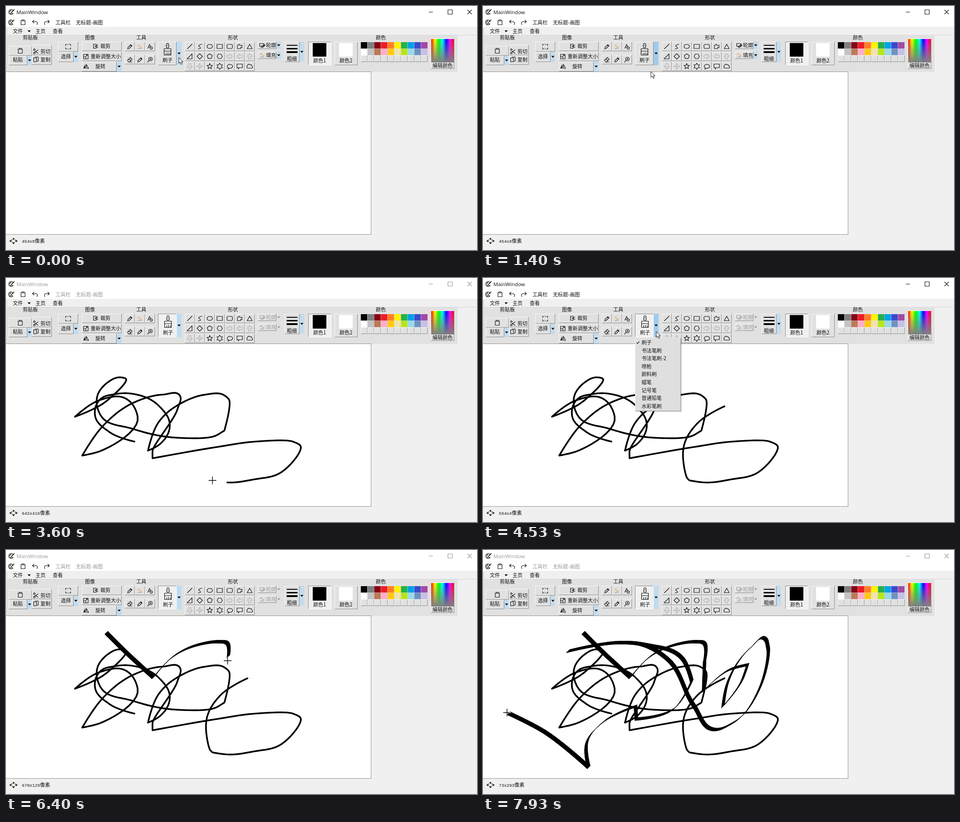
An HTML page for the animation above (8 s loop, 1038 by 540 pixels).

```html
<!DOCTYPE html>
<html lang="zh-CN">
<head>
<meta charset="utf-8">
<style>
html, body { margin: 0; height: 100%; overflow: hidden; background: #f0f0f0; }
svg { display: block; width: 100%; height: 100%; }
text { font: 11.1px "Noto Sans CJK SC", "Noto Sans CJK JP", "Noto Sans CJK", sans-serif; fill: currentColor; white-space: pre; }
.latin { font: 11.4px "Open Sans", "Noto Sans", sans-serif; }
.mono { font: 9.5px "Liberation Mono", monospace; }
.line { fill: none; stroke: currentColor; stroke-width: 1.2; stroke-linejoin: round; }
.solid { fill: currentColor; }
.strip { fill: #c3dcee; }
.dim { color: #b2b2b2; }
.handle { color: #999; }
.spill { color: #e0a63c; }
.idle #title { color: #999; }
.brush #opts, .brush #opts g { color: #a6a6a6; }
.brush #opts .strip { fill: #e1e1e1; }
.brush #opts .drop { fill: #999; }
#cross { mix-blend-mode: difference; }
</style>
</head>
<body>
<svg id="stage" viewBox="0 0 1038 540" color="#111"></svg>
<script>
const stage = document.getElementById('stage');
const $ = id => document.getElementById(id);

// ---------- drawing helpers ----------
const rect = (x, y, w, h, fill, more = '') =>
  `<rect x="${x}" y="${y}" width="${w}" height="${h}" fill="${fill}" ${more}/>`;
const text = (x, y, s, more = '') => `<text x="${x}" y="${y + 4}" ${more}>${s}</text>`;
const line = (d, more = '') => `<path class="line" d="${d}" ${more}/>`;
const solid = d => `<path class="solid" d="${d}"/>`;
const tint = (name, body) => `<g class="${name}">${body}</g>`;
const at = (x, y, body) => `<g transform="translate(${x} ${y})">${body}</g>`;
const edge = (x, y, w, h, lit, dark) =>
  `<path d="M${x + .5} ${y + h - .5}V${y + .5}H${x + w - .5}" fill="none" stroke="${lit}"/>` +
  `<path d="M${x + .5} ${y + h - .5}H${x + w - .5}V${y + .5}" fill="none" stroke="${dark}"/>`;
const button = (x, y, w, h) => rect(x, y, w, h, '#e1e1e1') + edge(x, y, w, h, '#f8f8f8', '#8a8a8a');
const sunken = (x, y, w, h) => rect(x, y, w, h, '#f0f0f0') + edge(x, y, w, h, '#8a8a8a', '#fff');
const triangle = (x, y) => `<path class="drop" d="M${x - 3.5} ${y - 2}h7l-3.5 4z"/>`;
const drop = (x, y, w, h, id = '') =>
  rect(x, y, w, h, '', `class="strip" id="${id}"`) + triangle(x + w / 2, y + h / 2);
const ring = (n, a, b = a, turn = 0) => 'M' + Array.from({ length: n }, (_, i) => {
  const r = i % 2 ? b : a, k = turn - Math.PI / 2 + i * 2 * Math.PI / n;
  return (r * Math.cos(k)).toFixed(1) + ' ' + (r * Math.sin(k)).toFixed(1);
}).join('L') + 'z';

// ---------- icons, centred on 0,0 ----------
const palette = line('M4-4A5.5 5.5 0 1 0 4.5 3C3 2 1 4 0 2S3 1 7-6L0 1') +
  solid('M-4-2h2v2h-2zM-2-4h2v2h-2zM-3 2h2v2h-2z');
const clip = line('M-2-4h-2.5v9.5h9v-9.5h-2.5M-2-5.5h4v2.5h-4z');
const pencil = line('M-5 5l1-3.5 6-6 2.5 2.5-6 6zM1-3.5l2.5 2.5');
const bucket = tint('handle', line('M-5 4h9')) + tint('spill', line('M-3-5l4 7 3-2')) + tint('dim', line('M-6-1l3-2'));
const brush = line('M-2-13.5q2-2.5 4 0l1 5-1 4h-4l-1-4zM-7.5-2.5h15v14h-15zM-7.5 3h15M-3 11v-4M1 11v-5M5 11v-4M0-11v2');
const undo = line('M-2-5l-3.5 3.5 3.5 3.5M-5-1.5h6c5 0 5 5 3 7');
const arrow = turn => `<g transform="rotate(${turn})">${line('M-6-2.5h6v-3l6 5.5-6 5.5v-3h-6z')}</g>`;
const shapes = [
  line('M-5.5 5.5l11-11'),
  line('M-4 5c7 1 7-2 3-4.5S0-4 5-5'),
  '<ellipse class="line" rx="6" ry="4.5"/>',
  line('M-6-4.5h12v9h-12z'),
  '<rect class="line" x="-6" y="-4.5" width="12" height="9" rx="2.5"/>',
  line('M-5 5v-7l4-3 2 3 4-1v6l-3-1v3z'),
  line('M0-5l5.5 10h-11z'),
  line('M5-5.5v11h-11z'),
  line(ring(4, 6)),
  line(ring(5, 5.8)),
  line(ring(6, 5.8, 5.8, Math.PI / 6)),
  ...[0, 180, -90, 90].map(turn => tint('dim', arrow(turn))),
  tint('dim', line(ring(8, 7, 2))),
  line(ring(10, 6.5, 2.8)),
  line(ring(12, 7, 4)),
  line('M-3 3.5a6 4.3 0 1 1 3 .8l-4 2z'),
  line('M-6-5h12v8h-7l-2 3v-3h-3z'),
  line('M-4 4a3 3 0 0 1-1-5.5a3.5 3.5 0 0 1 6-2a3 3 0 0 1 4 3a2.4 2.4 0 0 1 0 4.5z')
];

const swatches = ('#000 #7f7f7f #880015 #ed1c24 #ff7f27 #fff200 #22b14c #00a2e8 #3f48cc #a349a4 ' +
  '#fff #c3c3c3 #b97a57 #ffaec9 #ffc90e #efe4b0 #b5e61d #99d9ea #7092be #c8bfe7').split(' ');
const brushes = '刷子 书法笔刷 书法笔刷-2 喷枪 颜料刷 蜡笔 记号笔 普通铅笔 水彩笔刷'.split(' ');
const rowH = 17.62;

// ---------- window parts ----------
const frame = () =>
  rect(0, 0, 1038, 540, '#f0f0f0') + rect(0, 0, 1038, 46, '#fff') + rect(0, 64, 995, 82, '#e1e1e1') +
  rect(0, 64, 1038, 1, '#d8d8d8') + at(11.5, 13.5, palette) + at(11, 36.5, palette) + at(37.5, 36, clip) +
  at(64, 36, undo) + at(90, 36, `<g transform="scale(-1 1)">${undo}</g>`) +
  '<g id="title">' + text(23, 14, 'MainWindow', 'class="latin"') + text(109, 37, '工具栏') + text(154, 37, '无标题-画图') +
  line('M931.5 13.5h9.5M974 8.5h9.5v9.5h-9.5zM1017 8.5l9.5 9.5m0-9.5l-9.5 9.5') + '</g>' +
  tint('dim', line('M1.5 50v12', 'stroke-dasharray="1 2"')) +
  text(15, 56, '文件') + triangle(51, 56) + text(65, 56, '主页') + text(103, 56, '查看') +
  text(37, 70, '剪贴板') + text(174, 70, '图像') + text(287, 70, '工具') + text(489, 70, '形状') + text(815, 70, '颜色');

const clipboard = () =>
  button(6, 88, 51, 22) + at(31.5, 99, clip) + button(6, 110, 41, 21) + text(15, 119, '粘贴') + drop(47, 110, 10, 21) +
  button(57, 86, 44, 23) + text(76, 101, '剪切') + button(57, 109, 44, 21) + text(76, 119, '复制') +
  at(65, 101, line('M-1-1L6 4M-1 1L6-4M-2.5-2.5a1.8 1.8 0 1 0-.1 0M-2.5 5a1.8 1.8 0 1 0-.1 0')) +
  at(66, 119, line('M-5-4.5h6v9h-6zM-2-6h7v9h-3'));

const imageTools = () =>
  button(115, 79, 44, 22) + at(137, 90, line('M-5.5-2v-3h3M2.5-5h3v3M5.5 2v3h-3M-2.5 5h-3v-3M-1-5h2M-1 5h2')) +
  button(115, 101, 34, 23) + text(121, 112, '选择') + drop(149, 101, 10, 23) +
  button(167, 79, 88, 21) + at(198, 89, line('M-5-4.5h6v9h-6zM-2-1l7 4M-2 1l7-4')) + text(208, 89, '裁剪') +
  button(167, 101, 88, 21) + at(176, 112, line('M-5-5h10v10h-10zM-5 0h5v5M0-1l3-3M1-4h2v2')) + text(186.5, 112, '重新调整大小') +
  button(167, 123, 77, 22) + at(176, 134, solid('M-1-5v9h-5z') + line('M1-5v9h5z')) + text(197, 134, '旋转') +
  drop(244, 123, 11, 22);

function tools() {
  const letter = line('M-5 4l4-9 3 6M-3.5 1h4') + '<circle class="line" cx="2.5" cy="3" r="2.6"/>';
  const eraser = line('M-5 1l6-6 4 4-6 6h-2zM-2-2l4 4M-1 5h6');
  const zoom = '<circle class="line" cx="1" cy="-1.5" r="4"/>' + line('M-2 1.5l-4 4M-1-1.5h4M1-3.5v4');
  return [pencil, bucket, letter, eraser, pencil, zoom].map((icon, i) => {
    const x = 262 + i % 3 * 22.2, y = i < 3 ? 79 : 108;
    return button(x, y, 22, 21) + at(x + 11, y + 11, icon);
  }).join('') + `<g id="up">${button(335, 79, 41, 52)}</g><g id="down">${sunken(335, 79, 41, 52)}</g>` +
    `<g id="brush">${at(356, 97, brush)}${text(345, 120, '刷子')}</g>` + drop(376, 79, 11, 52, 'strip');
}

const shapeGrid = () => shapes.map((icon, i) => {
  const x = 394 + i % 7 * 22, y = 79 + (i / 7 | 0) * 22;
  return button(x, y, 22, 21) + at(x + 11, y + 10.5, icon);
}).join('');

const options = () =>
  '<g id="opts">' + button(555, 79, 41, 16) + at(565, 87, line('M-6-4h9v6h-9zM-3 4l3 1 6-5-2-2-5 4z')) +
  text(573, 87, '轮廓') + drop(596, 79, 10, 16) + button(555, 101, 41, 16) + at(565, 109, bucket) +
  text(573, 109, '填充') + drop(596, 101, 10, 16) + '</g>' + button(614, 79, 33, 45) +
  [2, 3, 4].map((h, i) => rect(618.5, 86 + i * 7, 24, h, '#000')).join('') +
  text(619, 117, '粗细') + drop(647, 79, 10, 45);

function colours() {
  let s = sunken(666, 79, 51, 52) + rect(676, 82, 30, 30, '#000') + text(677, 121, '颜色1') +
    button(724, 79, 51, 52) + rect(734, 82, 30, 30, '#fff') + text(735, 121, '颜色2');
  for (let i = 0; i < 30; i++) {
    const x = 782 + i % 10 * 14.75, y = 80 + (i / 10 | 0) * 14.6;
    s += i < 20 ? rect(x, y, 14.2, 14.2, swatches[i]) : button(x, y, 14.7, 14.6);
  }
  const stops = Array.from({ length: 7 }, (_, i) => `<stop offset="${i / 6}" stop-color="hsl(${i * 60} 100% 50%)"/>`).join('');
  return s + `<defs><linearGradient id="hue">${stops}</linearGradient><linearGradient id="fade" x2="0" y2="1">` +
    '<stop stop-color="#808080" stop-opacity="0"/><stop offset="1" stop-color="#808080"/></linearGradient></defs>' +
    button(936, 72, 52, 67) + rect(937, 73, 50, 52, 'url(#hue)') + rect(937, 73, 50, 52, 'url(#fade)') + text(940, 132, '编辑颜色');
}

const paper = () =>
  rect(-.5, 145.5, 805, 360, '#fff', 'stroke="#8f8f8f"') +
  '<path id="pen" fill="none" stroke="#000" stroke-width="3.7" stroke-linecap="round" stroke-linejoin="round"/>' +
  '<path id="nib" stroke="#000" stroke-linejoin="round"/>' +
  at(16.5, 520, line('M-8 0h5M3 0h5M0-6v3M0 3v3M-6-2l-2 2 2 2M6-2l2 2-2 2M-2-4l2-2 2 2M-2 4l2 2 2-2') +
    '<ellipse class="line" rx="5.5" ry="3.5" stroke-dasharray="2 2"/>') +
  '<text x="35" y="524"><tspan id="coords" class="mono"></tspan>像素</text>';

const menu = () =>
  '<g id="menu">' + rect(337, 134, 101, 162.5, '#000', 'opacity=".18"') + rect(335, 132, 101, 162.5, '#dfdfdf') +
  edge(335, 132, 101, 162.5, '#eee', '#a0a0a0') + line('M338.5 143l2 2 4-4.5', 'id="tick"') +
  brushes.map((b, i) => text(349.5, 143 + i * rowH, b, 'class="item"')).join('') + '</g>';

const cursors = () =>
  '<path id="arrow" d="M0 0v13l3-2.6 2.2 4.8 2.2-1-2.1-4.6h4z" fill="#fff" stroke="#111"/>' +
  '<path id="cross" d="M-8.5 0h17M0-8.5v17" stroke="#fff" stroke-width="1.4"/>';

// ---------- pointer motion ----------
// Smooth curve through the knots, each tangent that of the circle through
// a knot and its neighbours. A knot given twice makes a sharp turn.
function curve(k) {
  const pts = [k[0]], len = [0];
  const gap = i => k[i] && k[i + 1] ? Math.hypot(k[i + 1][0] - k[i][0], k[i + 1][1] - k[i][1]) : 0;
  const handle = (i, side) => {
    const before = gap(i - 1), after = gap(i);
    if (!before || !after) return [0, 0];
    const v = [0, 1].map(c => (k[i][c] - k[i - 1][c]) / before * after + (k[i + 1][c] - k[i][c]) / after * before);
    const reach = .36 * side * (side > 0 ? Math.min(after, 2 * before) : Math.min(before, 2 * after));
    return v.map(n => n * reach / (Math.hypot(...v) || 1));
  };
  for (let i = 0; i + 1 < k.length; i++) {
    if (!gap(i)) continue;
    const a = k[i], b = k[i + 1], u = handle(i, 1), v = handle(i + 1, -1);
    for (let n = 1; n <= 10; n++) {
      const t = n / 10, m = 1 - t, q = pts[pts.length - 1];
      const p = [0, 1].map(c => m * m * m * a[c] + 3 * m * m * t * (a[c] + u[c]) + 3 * m * t * t * (b[c] + v[c]) + t * t * t * b[c]);
      len.push(len[len.length - 1] + Math.hypot(p[0] - q[0], p[1] - q[1]));
      pts.push(p);
    }
  }
  return { pts, len };
}

// Each move starts where the one before it ended.
const MOVE = 0, PEN = 1, NIB = 2, FLOW = 1.2, REST = 1.7;
const tracks = [];
let last = [381, 114];
function go(from, to, ink, ease, path) {
  const knots = [last, ...path.split(' ').map(p => p.split(',').map(Number))];
  last = knots[knots.length - 1];
  tracks.push({ from, to, ink, ease, ...curve(knots) });
}

go(370, 1170, MOVE, FLOW, '370,145');
go(1430, 1900, MOVE, FLOW, '345,240 283,362');
go(1930, 2630, PEN, REST, '228,341 196,303 207,269 241,257 283,257 338,284 361,325 340,367 313,382 313,382 ' +
  '335,321 390,275 440,258 478,258 491,268 481.2,337.6');
go(2630, 3600, PEN, FLOW, '462,349 387,354 280,334 208,303 201,262 247,220 263,222 222,272 152,307 152,307 ' +
  '207,270 266,268 290,306 208,383 168,393 168,393 213,328 290,272 346,258 383,260 378,290 323,382 323,399 323,399 ' +
  '465,374 550,362 632,362 648,370 608,429 545,446 489,452.5 455,448');
go(3600, 3960, PEN, FLOW, '450,443 443,370 472,322 532,284');
go(4000, 4215, MOVE, FLOW, '412,149.2');
go(4215, 4270, MOVE, FLOW, '382,111');
go(4430, 5130, MOVE, FLOW, '381,154');
go(5240, 5530, MOVE, FLOW, '300,162 221,183');
go(5700, 6400, NIB, FLOW, '262,224 325,282 325,282 368,236 430,208 470,203 486,205 488.4,245');
go(6400, 7340, NIB, FLOW, '486,312 486,312 545,264 583,254 583,254 570,290 529,346 529,346 538,297 590,216 ' +
  '621,196 628,215 610,305 550,383 507,397 465,345 405,240 350,209 300,205 187,224 187,224 300,205 360,210 440,241 460,290');
go(7340, 7930, NIB, REST, '420,352 338,374 338,374 336,346 336,346 262,383 229,425 233,481 233,481 135,402 53,359.7');

// The part of a track covered at time t.
function covered({ from, to, ease, pts, len }, t) {
  const left = 1 - Math.min(1, Math.max(0, (t - from) / (to - from)));
  const goal = len[len.length - 1] * (1 - left ** ease);
  let i = 1;
  while (i < len.length - 1 && len[i] < goal) i++;
  const f = (goal - len[i - 1]) / (len[i] - len[i - 1]);
  return [...pts.slice(0, i), [0, 1].map(c => pts[i - 1][c] + (pts[i][c] - pts[i - 1][c]) * f)];
}

const pointer = t => covered(tracks.filter(tr => tr.from <= t).pop() || tracks[0], t).pop();
const inked = (ink, t) => tracks.filter(tr => tr.ink === ink && tr.from < t).map(tr => covered(tr, t));

// Sweep a slanted nib along the points.
function sweep(pts) {
  let d = '';
  for (let i = 1; i < pts.length; i++) {
    const [ax, ay] = pts[i - 1], [bx, by] = pts[i];
    const n = ax - bx + ay - by < 0 ? 3.3 : -3.3;
    d += `M${ax + n} ${ay - n}L${bx + n} ${by - n}L${bx - n} ${by + n}L${ax - n} ${ay + n}z`;
  }
  return d;
}

// ---------- playback ----------
stage.innerHTML = [frame, clipboard, imageTools, tools, shapeGrid, options, colours, paper, menu, cursors]
  .map(part => part()).join('');
const items = [...document.querySelectorAll('.item')];
const show = (id, on) => $(id).style.display = on ? '' : 'none';
const within = (t, a, b) => t >= a && t < b;
const STEP = 100 / 3;

function draw(ms) {
  const t = Math.floor((ms + 4) / STEP) * STEP;
  const [x, y] = pointer(t);
  const open = within(t, 370, 1300) || within(t, 4430, 5230);
  const picked = t >= 1430;
  const cross = !open && y > 146;

  stage.classList.toggle('idle', within(t, 1930, 4430) || t >= 5698);
  stage.classList.toggle('brush', picked);
  show('up', !picked);
  show('down', picked);
  $('brush').setAttribute('transform', picked ? 'translate(1 1)' : '');
  $('strip').style.fill = within(t, 370, 1430) || within(t, 4430, 5270) ? '#a2cbea' : '#c0dbef';

  show('menu', open);
  show('tick', picked);
  const hover = Math.floor((y - 134) / rowH);
  items.forEach((item, i) => item.style.fill = i === hover ? '#fff' : '');

  $('pen').setAttribute('d', inked(PEN, t - STEP).map(p => 'M' + p.join('L')).join(''));
  $('nib').setAttribute('d', inked(NIB, t - STEP).map(sweep).join(''));

  // Coordinates stand still while the pointer is off the paper.
  const seen = t - STEP / 2;
  const [sx, sy] = pointer(within(seen, 4215, 5250) ? 4215 : seen);
  $('coords').textContent = seen < 1430 ? '454x8'
    : Math.floor(sx * 1.37) + 'x' + Math.max(0, Math.floor((sy - 146) * 1.37));

  show('cross', cross);
  show('arrow', !cross);
  $(cross ? 'cross' : 'arrow').setAttribute('transform', `translate(${x} ${y})`);
}

const start = performance.now();
function tick() {
  draw((performance.now() - start) % 8000);
  requestAnimationFrame(tick);
}
tick();
</script>
</body>
</html>
```
